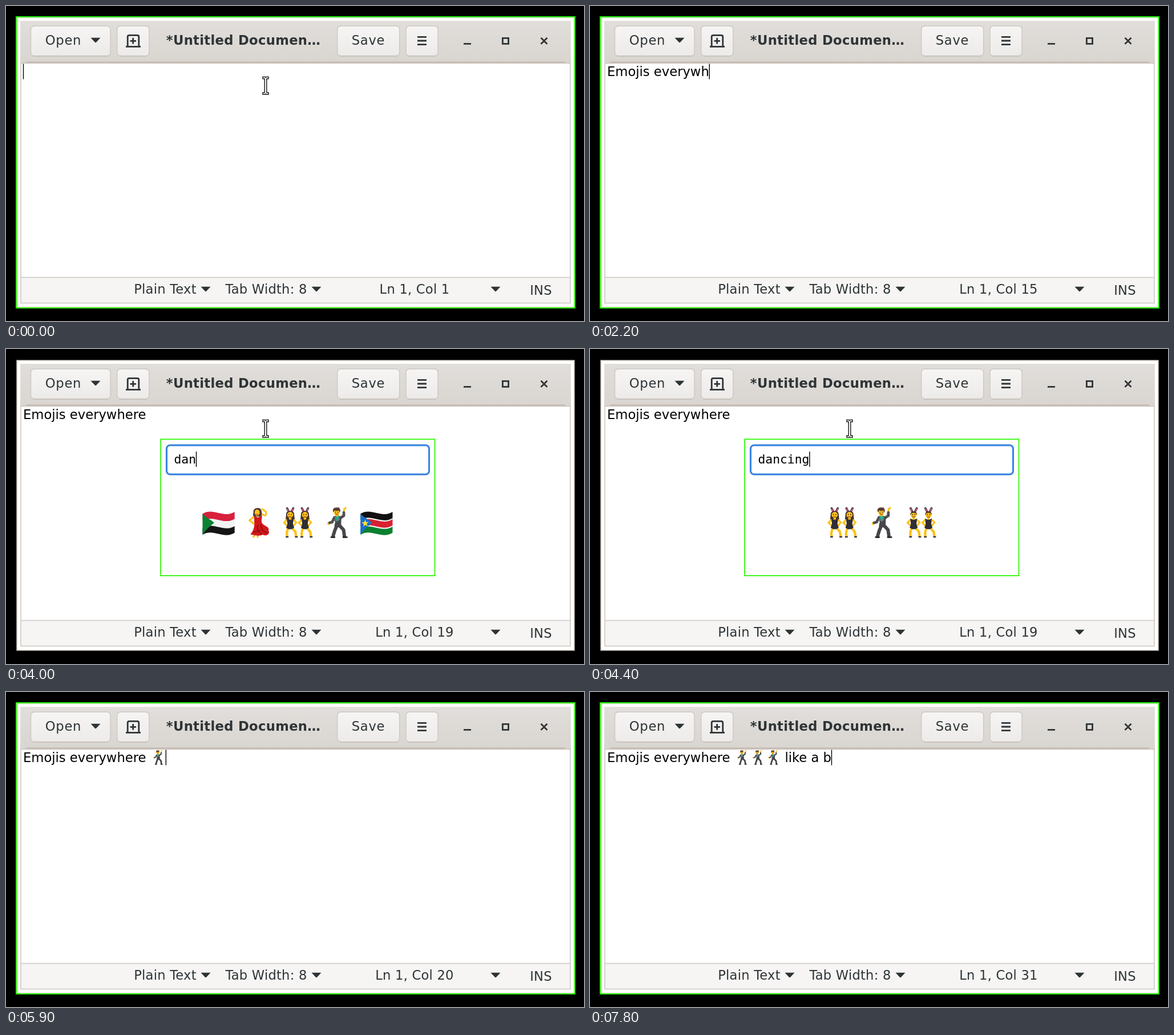
Recreate the animation shown at these times as an HTML page. Size 1013 by 553 pixels, loop 8 s.

```html
<!DOCTYPE html>
<html lang="en">
<head>
<meta charset="utf-8">
<title>Emoji picker</title>
<style>
html, body { margin: 0; height: 100%; overflow: hidden; background: #000; }
svg { display: block; width: 100vw; height: 100vh; }
text { font: 22.67px "DejaVu Sans", sans-serif; white-space: pre; }
.ui { fill: #2e3436; text-anchor: middle; letter-spacing: .2px; }
.wide { letter-spacing: .7px; }
.title { font-weight: bold; letter-spacing: .32px; }
#query { font: 21.33px "DejaVu Sans Mono", monospace; }
.btn rect { fill: url(#face); stroke: #cdc7c2; stroke-width: 1.4; }
.line { fill: none; stroke: #cdc5be; stroke-width: 1.5; }
.icon { fill: none; stroke: #2e3436; stroke-width: 2.8; }
.limb { fill: none; stroke-linecap: round; stroke-linejoin: round; }
</style>
</head>
<body>
<svg viewBox="0 0 1013 553" xml:space="preserve">
<defs>
  <linearGradient id="bar" x2="0" y2="1"><stop stop-color="#e1dedb"/><stop offset="1" stop-color="#d9d5d0"/></linearGradient>
  <linearGradient id="face" x2="0" y2="1"><stop stop-color="#f6f5f4"/><stop offset="1" stop-color="#edebe9"/></linearGradient>
  <linearGradient id="blue" x2="0" y2="1"><stop stop-color="#29b6f6"/><stop offset="1" stop-color="#0a83d0"/></linearGradient>
  <linearGradient id="pink" x2="0" y2="1"><stop stop-color="#d81b60"/><stop offset=".5" stop-color="#e0407c"/><stop offset="1" stop-color="#f778a8"/></linearGradient>
  <linearGradient id="fur" x2="0" y2="1"><stop stop-color="#454545"/><stop offset="1" stop-color="#1c1c1c"/></linearGradient>
  <radialGradient id="sun"><stop offset=".5" stop-color="#fba61c"/><stop offset="1" stop-color="#f28a12"/></radialGradient>
  <radialGradient id="coral"><stop stop-color="#ff8a80"/><stop offset="1" stop-color="#ee4238"/></radialGradient>
  <path id="down" d="M-8.5-4.2h17l-7.2 7.8q-1.3 1.2-2.6 0z" fill="#2e3436"/>

  <!-- each picture fills about 100 units around its centre -->
  <g id="abcd">
    <rect x="-49" y="-49" width="98" height="98" rx="6" fill="url(#blue)"/>
    <g fill="#fff" text-anchor="middle" id="letters"></g>
  </g>
  <g id="mouth">
    <path d="M-49 1C-35-8-23-30-9-30Q-4-30 0-26Q4-30 9-30C23-30 35-8 49 1C34 23 18 33 0 33S-34 23-49 1z" fill="url(#pink)"/>
    <path d="M-40 0Q-18-8-8-8Q0-5 8-8Q18-8 40 0Q22 15 0 15T-40 0z" fill="#5a1520"/>
    <path d="M-25-4Q-12-8-8-7Q0-4 8-7Q12-8 25-4Q0 6-25-4z" fill="#f5f0f0"/>
    <path d="M-17 23Q0 28 17 23" class="limb" stroke="#ffb0cd" stroke-width="3"/>
  </g>
  <g id="gorilla">
    <path d="M0-49C20-49 30-35 33-17C43-10 46 12 42 25C36 44 18 49 0 49S-36 44-42 25C-46 12-43-10-33-17C-30-35-20-49 0-49z" fill="url(#fur)"/>
    <path d="M-28-8C-27-21-9-21 0-14C9-21 27-21 28-8C29 3 20 8 18 11C32 18 30 43 0 43S-32 18-18 11C-20 8-29 3-28-8z" fill="#747474"/>
    <path d="M-25-10Q-13-18-3-8M25-10Q13-18 3-8" class="limb" stroke="#4a4a4a" stroke-width="5"/>
    <circle cx="-14" cy="-3" r="6" fill="#181818"/><circle cx="14" cy="-3" r="6" fill="#181818"/>
    <path d="M-13 15Q0 4 13 15Q8 20 0 17Q-8 20-13 15z" fill="#333"/>
    <path d="M-18 33Q0 23 18 33" class="limb" stroke="#222" stroke-width="4"/>
  </g>
  <g id="arms" class="limb" stroke="#e53c35" stroke-width="6.5">
    <path d="M-8 4C-18 14-36 6-40-4Q-43-15-35-22M-9 9C-24 21-38 8-48 16M-8 12C-24 18-25 32-46 34M-6 12C-20 24-15 39-30 46M-4 12C-8 27-2 32-13 43"/>
  </g>
  <g id="octopus">
    <use href="#arms"/><use href="#arms" transform="scale(-1 1)"/>
    <path d="M0-46C18-46 27-32 24-18C22-6 14-4 16 10Q0 25-16 10C-14-4-22-6-24-18C-27-32-18-46 0-46z" fill="url(#coral)"/>
    <g fill="#fff" stroke="#b3261e" stroke-width="2"><circle cx="-11" cy="-10" r="7.5"/><circle cx="11" cy="-10" r="7.5"/></g>
    <circle cx="-10" cy="-10" r="3.5" fill="#222"/><circle cx="10" cy="-10" r="3.5" fill="#222"/>
    <ellipse cy="6" rx="5" ry="4" fill="#8e1a17"/>
  </g>
  <g id="crying">
    <circle r="49" fill="url(#sun)"/>
    <path d="M-21 44Q0 18 21 44Q0 54-21 44z" fill="#ffe02f"/>
    <path d="M-17 27C-18-2 18-2 17 27Q0 38-17 27z" fill="#34251f"/>
    <path d="M-36-27Q-27-33-16-31M36-27Q27-33 16-31" class="limb" stroke="#65401e" stroke-width="5"/>
    <path d="M-37-9Q-25-3-12-9V40Q-16 50-29 48Q-43 46-40 34Q-33 20-37-9zM37-9Q25-3 12-9V40Q16 50 29 48Q43 46 40 34Q33 20 37-9z" fill="#5f78fb"/>
    <path d="M-39-11Q-25-4-10-11M39-11Q25-4 10-11" class="limb" stroke="#4d3521" stroke-width="5"/>
  </g>
  <g id="sudan"></g>
  <g id="southsudan"></g>
  <g id="dancer">
    <path d="M12-28Q29-17 25-36L14-44M-13-20L-28-8L-14 3" class="limb" stroke="#fcc21b" stroke-width="6"/>
    <path d="M-8 35L-15 46M2 35L-2 46" class="limb" stroke="#fcc21b" stroke-width="6"/>
    <path d="M-13-22L0-17L13-24L11-4C15 13 38 10 34 25C40 36 28 46 15 39C4 45-9 41-25 38Q-12 22-12 4z" fill="#d3181b"/>
    <path d="M10 8Q8 24 28 33M-1 8Q-6 25 10 36M-14 31L5 25" class="limb" stroke="#921014" stroke-width="4"/>
    <path d="M-15-34C-18-49 8-54 11-39Q15-22 6-20L-7-21Q-20-17-15-34z" fill="#543930"/>
    <ellipse cx="-3" cy="-33" rx="8" ry="10" fill="#fcc21b"/>
    <path d="M-7-28q4 3 7 0" class="limb" stroke="#a63b21" stroke-width="2"/>
  </g>
  <g id="bunny">
    <path d="M-10-10L-20 0L-10 9M10-10L20-1L11 9" class="limb" stroke="#fcc21b" stroke-width="6"/>
    <path d="M-5 16Q-13 28-10 44M5 16L17 29L19 44" class="limb" stroke="#fcc21b" stroke-width="8"/>
    <path d="M-13 46h6M17 46h6" class="limb" stroke="#302d35" stroke-width="4"/>
    <path d="M-11-14Q0-7 11-14L9 4L13 16Q0 27-13 16L-9 4z" fill="#302d35"/>
    <path d="M-5-37L-10-47M5-37L10-47" class="limb" stroke="#3a3035" stroke-width="7"/>
    <path d="M-6-38L-10-46M6-38L10-46" class="limb" stroke="#ee658b" stroke-width="3"/>
  </g>
  <g id="head">
    <circle cy="-26" r="10" fill="#fcc21b"/>
    <path d="M-4-27v1M4-27v1" class="limb" stroke="#38231c" stroke-width="3"/>
    <path d="M-4-20Q0-17 4-20" class="limb" stroke="#7e3a24" stroke-width="2"/>
  </g>
  <g id="woman">
    <path d="M-13-27C-14-42 14-42 13-27L15-7H-15z" fill="#46302b"/>
    <use href="#bunny"/><path d="M-4-18h8v8h-8z" fill="#fcc21b"/><use href="#head"/>
    <path d="M-10-26Q-7-36 0-35Q7-36 10-26L7-37H-7z" fill="#46302b"/>
  </g>
  <g id="fellow">
    <use href="#bunny"/><path d="M-4-18h8v8h-8z" fill="#fcc21b"/><use href="#head"/>
    <path d="M-11-25C-12-41 12-41 11-25L7-31Q0-34-7-31z" fill="#46302b"/>
  </g>
  <g id="women"><use href="#woman" x="-24"/><use href="#woman" x="24"/></g>
  <g id="men"><use href="#fellow" x="-24"/><use href="#fellow" x="24"/></g>
  <g id="man">
    <path d="M22-36L23-44L28-48" class="limb" stroke="#fcc21b" stroke-width="6"/>
    <circle cx="-27" cy="2" r="5" fill="#fcc21b"/>
    <path d="M-1 10L-8 27L-13 44M8 9L21 23L24 44" class="limb" stroke="#47474b" stroke-width="11"/>
    <path d="M-19 47h11M20 47h12" class="limb" stroke="#29292c" stroke-width="5"/>
    <path d="M-10-14L-16-2L-24 0M12-16L22-23L22-33" class="limb" stroke="#505055" stroke-width="9"/>
    <path d="M-13-20L0-24L14-20L13 13Q2 18-9 12L-6-3z" fill="#47474b"/>
    <path d="M-7-23H7L5-11L-1-3z" fill="#17b297"/>
    <path d="M-8-22L-2-4L-8-9zM8-22L-1-3L8-9z" fill="#77777c"/>
    <path d="M-5-29H5V-23L0-18L-5-23z" fill="#eda51a"/>
    <ellipse cx="-1" cy="-35" rx="10" ry="11" fill="#fcc21b"/>
    <path d="M-12-34C-17-46-8-51 2-49L8-50L7-47Q13-43 9-33L6-40Q-1-37-8-40z" fill="#5b3c31"/>
    <path d="M-5-35v1M3-35v1" class="limb" stroke="#38231c" stroke-width="2.5"/>
    <path d="M-5-29Q-1-26 3-29" class="limb" stroke="#7e3a24" stroke-width="2"/>
  </g>
</defs>

<path d="M19 20H996V529H19z" fill="#fff" stroke="#c9c1b9" stroke-width="1.6"/>
<path id="focus" d="M18 19H997V530H18z" fill="none" stroke="#2af800" stroke-width="2"/>
<path d="M25 26H990V100H25z" fill="url(#bar)"/>
<path d="M35 98.6H980" stroke="#bdb2a9" stroke-width="1.6"/>
<path d="M26 477H989V521H26z" fill="#f6f5f4"/>
<path class="line" d="M25 100.5H990M26 100V521.5H989V100M26 476.5H989"/>
<g class="btn" id="buttons"></g>
<g class="icon">
  <path d="M210 71.3H236M213.2 71V54Q213.2 51.3 216 51.3H230Q232.8 51.3 232.8 54V71M217.5 61.3H228M222.7 56V66.5"/>
  <path d="M721 54.3H737M721 61H737M721 67.7H737M802 66.3H815M870.4 56.4H880.6V66.4H870.4zM937.5 55.7L948.5 66.7M948.5 55.7L937.5 66.7"/>
</g>
<use href="#down" x="157" y="60"/>
<use href="#down" x="350" y="497"/><use href="#down" x="544" y="497"/><use href="#down" x="858" y="497"/>
<text class="ui wide" x="100.5" y="68">Open</text>
<text class="ui title" x="416" y="68">*Untitled Documen…</text>
<text class="ui wide" x="635" y="68">Save</text>
<text class="ui" x="279" y="505">Plain Text</text>
<text class="ui" x="456" y="505">Tab Width: 8</text>
<text class="ui" x="716" y="505" id="place"></text>
<text class="ui" x="937.5" y="506.5">INS</text>

<text id="lead" x="30" y="122.5"></text>
<g id="inline"></g>
<text id="tail" y="122.5"></text>
<path id="caret" d="M.5 101.5V128.5" stroke="#000" stroke-width="1.4"/>
<path id="pointer" d="M450 124.5H454L455 125.5L456 124.5H460V127.8H456.8V152H460V155.3H456L455 154.3L454 155.3H450V152H453.2V127.8H450z" fill="#fff" stroke="#222" stroke-width="1.5"/>

<g id="popup">
  <path d="M271 158.3H751.6V397.8H271z" fill="#fff" stroke="#2af800" stroke-width="1.7"/>
  <rect x="280.6" y="168" width="461.8" height="53" rx="7" class="line"/>
  <rect id="ring" x="281.5" y="169" width="460" height="51" rx="6" fill="none" stroke="#3584e4" stroke-width="3"/>
  <text id="query" x="294.5" y="201"></text>
  <path id="mark" d="M.5 180V207" stroke="#000" stroke-width="1.4"/>
  <g id="results"></g>
</g>
</svg>
<script>
const $ = id => document.getElementById(id);
const LOOP = 8000, START = 30, EMOJI = 27.2, GAP = 69.2;

// typed text by time; "*" stands for the dancing man
const typed = [[200, "E"], [400, "m"], [500, "o"], [700, "j"], [900, "i"], [1000, "s"],
  [1200, " e"], [1400, "v"], [1500, "e"], [1700, "r"], [1900, "y"], [2100, "w"], [2200, "h"],
  [2300, "e"], [2400, "re"], [2800, " "], [5900, "*"], [6200, "*"], [6300, "*"], [6600, " "],
  [6900, "l"], [7000, "i"], [7200, "k"], [7300, "e"], [7500, " "], [7600, "a "], [7800, "b"]];
const searched = [[3900, "da"], [4000, "n"], [4100, "c"], [4200, "in"], [4400, "g"]];
const until = (list, t) => list.filter(s => s[0] <= t).map(s => s[1]).join("");

const put = (id, x, y, size) =>
  `<use href="#${id}" transform="translate(${x} ${y}) scale(${size})"/>`;

$("buttons").innerHTML = [[43.5, 139.5], [194.8, 56], [580.7, 109], [701, 56]].map(([x, w]) =>
  `<path d="M${x + 4} 88.2h${w - 8}" stroke="#c8c2bc" stroke-width="1.6"/>` +
  `<rect x="${x}" y="35" width="${w}" height="52.4" rx="6"/>`).join("");

$("letters").innerHTML = [..."ABCD"].map((c, i) =>
  `<text x="${i % 2 ? 19 : -18}" y="${i < 2 ? -9 : 34}" style="font:500 33px Roboto,sans-serif">${c}</text>`).join("");

// a waving stripe, and the hoist triangle
const stripe = (y, h, color) =>
  `<path d="M-52 ${y}c34-22 68 16 104-6v${h}c-36 22-70-16-104 6z" fill="${color}"/>`;
const hoist = color => `<path d="M-52-29C-38-15-26-10-14 0C-28 11-40 21-52 39z" fill="${color}"/>`;
$("sudan").innerHTML = stripe(-29, 23, "#d7203c") + stripe(-6, 23, "#f3f3f3") +
  stripe(17, 22, "#151515") + hoist("#0c8134");
$("southsudan").innerHTML = stripe(-29, 21, "#111") + stripe(-9, 28, "#f3f3f3") +
  stripe(-5, 20, "#d92130") + stripe(19, 20, "#0b8130") + hoist("#1770cc") +
  `<path d="M-37-10l3 8 9-1-7 6 4 9-8-5-7 6 2-9-8-5 9-1z" fill="#ffe23f"/>`;

function results(t) {
  const row = ids => ids.map((id, i) => put(id, 511 + (i - (ids.length - 1) / 2) * GAP, 305, .54));
  if (t < 4000) return t < 3400 ? [] : row(["abcd", "mouth", "gorilla", "octopus", "crying"]);
  if (t < 4200) return row(["sudan", "dancer", "women", "man", "southsudan"]);
  const dances = ["women", "man", "men"];
  if (t < 4700) return row(dances);
  const chosen = t < 4900 ? 0 : 1;
  const xs = chosen ? [423, 511, 601.5] : [444, 531, 601.5];
  return dances.map((id, i) => put(id, xs[i], i == chosen ? 305 : 304, i == chosen ? .88 : .54));
}

const show = (id, on) => $(id).setAttribute("visibility", on ? "visible" : "hidden");
const width = id => $(id).textContent ? $(id).getComputedTextLength() : 0;
const shift = (id, x) => $(id).setAttribute("transform", `translate(${x} 0)`);

function draw(t) {
  const text = until(typed, t), parts = text.split("*"), count = parts.length - 1;
  const open = t >= 3300 && t < 5200;
  $("place").textContent = `Ln 1, Col ${text.length + 1}`;
  $("lead").textContent = parts[0];
  $("tail").textContent = count ? parts[count] : "";
  const x = START + width("lead"), end = x + count * EMOJI;
  $("inline").innerHTML = Array.from({length: count}, (_, i) =>
    put("man", x + (i + .5) * EMOJI, 115, .255)).join("");
  $("tail").setAttribute("x", end);
  shift("caret", end + width("tail"));
  show("caret", !open);
  show("focus", !open);
  show("popup", open);
  show("pointer", t < 200 || t >= 3300 && t < 5900);

  $("query").textContent = until(searched, t);
  shift("mark", 294.5 + width("query"));
  show("mark", open && t >= 3500);
  show("ring", open && t >= 3500);
  $("ring").setAttribute("opacity", Math.min(1, (t - 3400) / 300));
  $("results").innerHTML = open ? results(t).join("") : "";
}

let start, last;
function tick(now) {
  start ??= now;
  const t = Math.floor((now - start) % LOOP / 100) * 100;
  if (t !== last) draw(last = t);
  requestAnimationFrame(tick);
}
draw(0);
requestAnimationFrame(tick);
</script>
</body>
</html>
```
